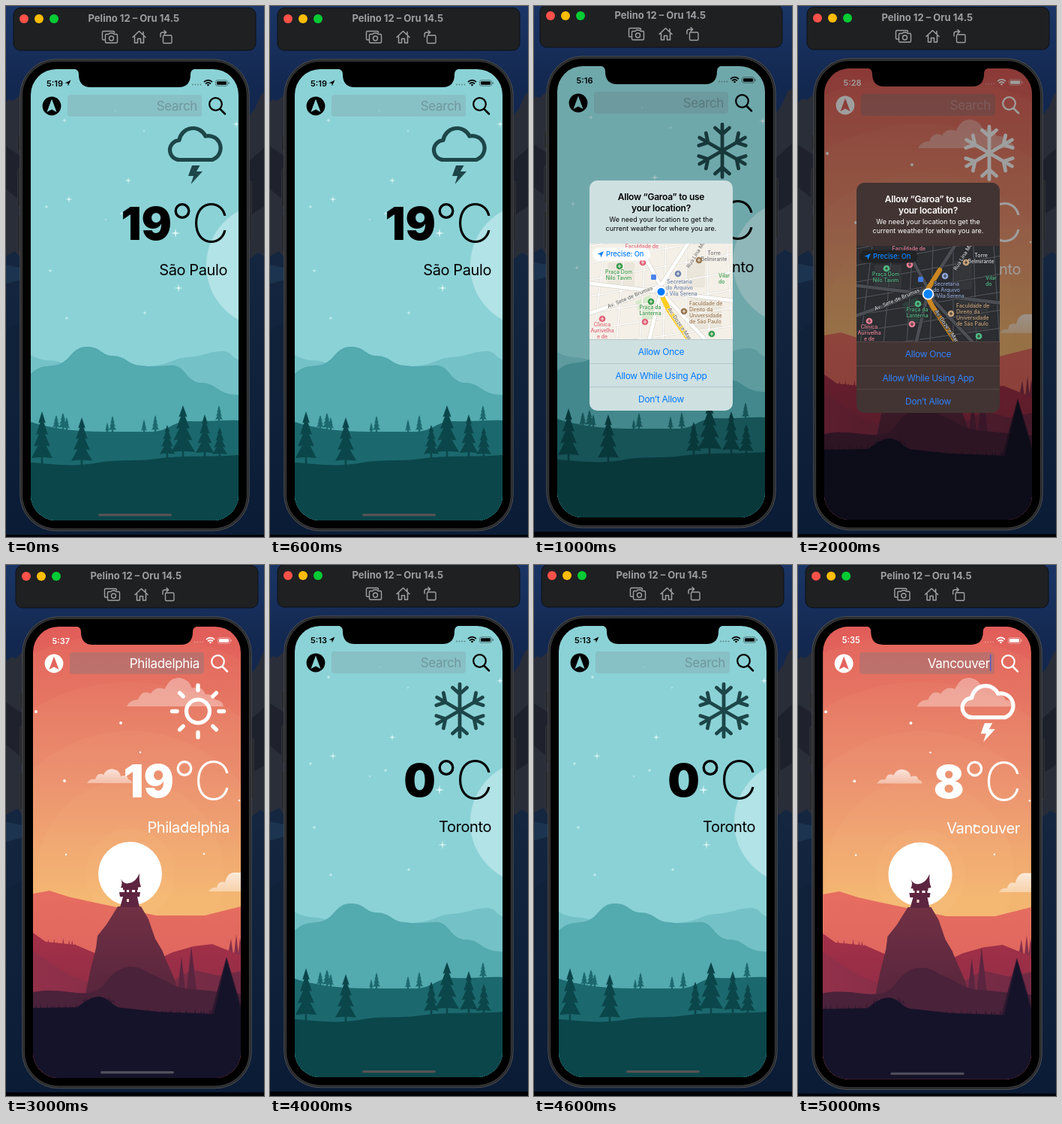
These frames come from a looping animation (344x706 px, 6000 ms). An HTML page:

```html
<!DOCTYPE html>
<html lang="en">
<head>
<meta charset="utf-8">
<title>Weather app</title>
<style>
html, body { margin: 0; width: 100%; height: 100%; overflow: hidden; background: #0c1b38; }
svg { display: block; width: 344px; height: 706px; font-family: Inter, Roboto, sans-serif; }
</style>
</head>
<body>
<svg viewBox="0 0 344 706" xmlns="http://www.w3.org/2000/svg">
  <defs>
    <linearGradient id="desk" x2="0" y2="1">
      <stop offset="0" stop-color="#1b3768"/><stop offset=".16" stop-color="#132850"/>
      <stop offset=".5" stop-color="#14263f"/><stop offset="1" stop-color="#0a1b36"/>
    </linearGradient>
    <linearGradient id="dusk" x2="0" y2="1">
      <stop offset="0" stop-color="#e15c59"/><stop offset=".35" stop-color="#e98868"/>
      <stop offset=".6" stop-color="#f0b069"/>
    </linearGradient>
    <linearGradient id="coral" x2="0" y2="1">
      <stop offset="0" stop-color="#e66d60"/><stop offset="1" stop-color="#d65d5c"/>
    </linearGradient>
    <linearGradient id="peak" x2="0" y2="1">
      <stop offset="0" stop-color="#713044"/><stop offset="1" stop-color="#54243b"/>
    </linearGradient>
    <linearGradient id="wine" x2="0" y2="1">
      <stop offset="0" stop-color="#a33048"/><stop offset="1" stop-color="#7b2943"/>
    </linearGradient>
    <linearGradient id="plum">
      <stop offset="0" stop-color="#93304a"/><stop offset="1" stop-color="#702a44"/>
    </linearGradient>
    <linearGradient id="puff" x2="0" y2="1">
      <stop offset="0" stop-color="#fff" stop-opacity=".75"/><stop offset="1" stop-color="#fff" stop-opacity=".4"/>
    </linearGradient>
    <clipPath id="screen"><rect x="33" y="84" width="277" height="600" rx="34"/></clipPath>
    <clipPath id="map"><rect x="76" y="320" width="191" height="127"/></clipPath>
  </defs>
  <g id="stage"></g>
</svg>
<script>
const shots = [
  { x: 0, y: 0, time: '5:19', temp: '19', city: 'São Paulo', icon: 'storm', here: true },
  { x: -2, y: -4, time: '5:16', temp: '0', city: 'Toronto', icon: 'snow', ask: true },
  { x: 2, y: -1, time: '5:28', temp: '0', city: 'Toronto', icon: 'snow', dark: true, ask: true },
  { x: 3, y: -2, time: '5:37', temp: '19', city: 'Philadelphia', icon: 'sun', dark: true, query: 'Philadelphia' },
  { x: 0, y: -3, time: '5:13', temp: '0', city: 'Toronto', icon: 'snow', here: true },
  { x: 0, y: -2.4, k: 1.003, time: '5:35', temp: '8', city: 'Vancouver', icon: 'storm', dark: true, query: 'Vancouver', caret: true }
];

const path = (d, fill, more = '') => `<path d="${d}" fill="${fill}" ${more}/>`;
const line = (d, color, w, more = '') =>
  path(d, 'none', `stroke="${color}" stroke-width="${w}" stroke-linecap="round" stroke-linejoin="round" ${more}`);
const disc = (x, y, r, fill, more = '') => `<circle cx="${x}" cy="${y}" r="${r}" fill="${fill}" ${more}/>`;
const box = (x, y, w, h, r, fill, more = '') =>
  `<rect x="${x}" y="${y}" width="${w}" height="${h}" rx="${r}" fill="${fill}" ${more}/>`;
const text = (x, y, s, size, fill, more = '') =>
  `<text x="${x}" y="${y}" font-size="${size}" fill="${fill}" ${more}>${s}</text>`;
const END = 'text-anchor="end"', MID = 'text-anchor="middle"';
const spaced = v => `letter-spacing="${v}"`;
const each = (list, fn) => list.map(a => fn(...a)).join('');

function star(x, y, r) {
  const q = r * .14;
  return path(`M${x} ${y - r}L${x + q} ${y - q}L${x + r} ${y}L${x + q} ${y + q}L${x} ${y + r}L${x - q} ${y + q}L${x - r} ${y}L${x - q} ${y - q}Z`, '#e2f7f7');
}

function tree(x, top, base, w) {
  const right = [], left = [];
  for (let i = 1; i <= 4; i++) {
    const y = top + (base - top) * .9 * i / 4, half = w * (i + .6) / 4.6;
    const inner = i < 4 ? half * .5 : 1.3;
    right.push([x + half, y], [x + inner, y - 1]);
    left.unshift([x - inner, y - 1], [x - half, y]);
  }
  return 'M' + [[x, top], ...right, [x + 1.3, base + 3], [x - 1.3, base + 3], ...left].join('L') + 'Z';
}

function spikes(x0, x1, y, h, step) {
  let d = '';
  for (let x = x0, i = 0; x < x1; x += step, i++) {
    d += `M${x} ${y}l1.3 ${-h * (.55 + .45 * Math.sin(i * 2.4))}l1.3 ${h}Z`;
  }
  return d;
}

const hill = (x, y, curve, fill) => path(`M${x} ${y}${curve}V684H${x}Z`, fill);

function lightScene() {
  const back = [[67, 544, 562, 5], [76, 541, 563, 6], [81, 547, 563, 4], [135, 554, 566, 3], [142, 545, 566, 5],
    [184, 550, 566, 4], [199, 544, 566, 5], [284, 531, 552, 5]];
  const front = [[48, 539, 608, 14], [101, 547, 611, 14], [236, 531, 600, 16], [265, 543, 600, 12],
    [215, 557, 600, 10], [285, 560, 600, 10]];
  const stars = [[78, 152, 3], [146, 139, 1.5], [184, 166, 2], [307, 157, 5], [163, 232, 4.5], [84, 257, 5],
    [54, 267, 3], [154, 276, 3], [133, 284, 2], [226, 302, 6.5], [230, 375, 6], [59, 352, 3], [185, 408, 3], [81, 415, 3]];
  return box(33, 84, 277, 600, 0, '#8bd2d6') + disc(349, 345, 82, '#b2e3e6') + each(stars, star) +
    hill(33, 464, 'C48 473 58 470 70 473C110 486 160 482 198 478C224 475 222 468 242 467C270 465 268 459 290 459C302 460 301 468 310 470', '#74c2c7') +
    hill(33, 489, 'C47 476 56 480 68 477C86 473 87 453 108 453C126 453 127 464 141 465C161 465 163 478 181 478C199 481 214 477 225 478C241 482 240 498 259 501C282 500 280 517 310 517', '#53aaaf') +
    hill(33, 553, 'C60 562 96 566 130 566H196C217 565 222 552 245 552C270 553 290 550 310 551', '#1b696e') +
    path(back.map(a => tree(...a)).join(''), '#1b696e') +
    hill(33, 607, 'C64 609 88 613 118 608C145 602 175 606 200 602C230 597 276 600 310 597', '#0b464a') +
    path(front.map(a => tree(...a)).join(''), '#0b464a');
}

function temple() {
  const c = '#5d2540';
  return path('M150 419Q154 427 161 425Q170 424 175 412Q174 423 177 430Q164 433 150 431Q153 425 150 419Z', c) +
    box(153, 430, 20, 4, 0, c) + box(155, 433, 3, 7, 0, c) + box(161, 433, 4, 7, 0, c) + box(169, 433, 3, 7, 0, c) +
    path('M148 437H176L175 443H149Z', c) + path('M153 443H172L175 457H149Z', c) + box(158, 446, 3, 4, 0, '#f1d9cf');
}

function darkScene() {
  const stars = [[37, 197, 1.9], [150, 212, 1.9], [176, 251, 1.2], [75, 289, 1.9], [235, 348, 1.9], [261, 386, 1.2], [77, 387, 1.2], [308, 315, 1.3]];
  const halo = [320, 255, 190, 125, 60].map(r => disc(162.5, 412.5, r, '#ffd9a0', 'opacity=".05"')).join('');
  return box(33, 84, 277, 600, 0, 'url(#dusk)') + halo +
    path('M158 190Q162 181 173 181Q178 167 190 173Q197 162 209 167Q215 151 229 152Q241 154 245 166Q257 161 263 174Q272 172 276 181Q286 182 287 190Z', '#fff', 'opacity=".34"') +
    path('M105 292Q108 286 116 287Q119 277 127 281Q132 271 142 274Q149 276 150 283Q159 280 160 287Q165 288 165 292Z', 'url(#puff)') +
    path('M267 436Q271 430 278 431Q280 421 289 424Q292 409 306 411L310 411V436Z', 'url(#puff)') +
    each(stars, (x, y, r) => disc(x, y, r, '#fff')) + disc(162.5, 412.5, 42.5, '#fff') +
    hill(33, 439, 'L55 435L80 443L107 449L197 468L262 468L310 456', 'url(#coral)') +
    path('M301 520L304 493L307 520ZM293 520L297 499L300 520ZM306 525L309 497L313 525Z', '#85304a') +
    hill(33, 491, 'L50 503L90 507L120 520L200 526L219 517L247 509L272 506L310 521', 'url(#wine)') +
    path(spikes(48, 90, 507, 9, 4), '#a03048') +
    hill(33, 515, 'L57 531L83 548L106 556L210 561L245 540L280 548L310 542', 'url(#plum)') +
    path('M99 592L109 543L117 511L119 495L131 480L146 456H177L187 473L196 499L205 514L212 531L221 551L234 592Z', 'url(#peak)') +
    path('M225 575L231 523L237 575ZM237 575L244 509L252 575Z', '#5b2540') +
    hill(33, 570, 'C75 561 110 585 129 558C145 534 169 530 188 545C208 551 220 566 246 566L310 572', '#4a223a') +
    path(spikes(33, 100, 594, 10, 3) + spikes(100, 140, 582, 7, 3) + spikes(140, 275, 598, 6, 4), '#2d1930') +
    path('M270 600L291 523L314 600Z', '#2d1930') +
    hill(33, 591, 'L92 590C105 580 112 576 121 576C136 577 138 591 154 591L200 596L274 599L291 527L310 592', '#151329') +
    temple();
}

const icons = {
  storm: c => line('M232 204.5A13 13 0 0 1 231 178.5A18.5 18.5 0 0 1 266 173A16.4 16.4 0 0 1 275 204.5Z', c, 5.2) +
    path('M248 212H258.5L254 220H262L246.5 237L250 226H243Z', c),
  snow: c => {
    let s = '';
    for (let a = 0; a < 360; a += 60) {
      s += line('M253 196.5V161.5M243.5 166L253 174.5L262.5 166', c, 4.8, `transform="rotate(${a} 253 196.5)"`);
    }
    return s;
  },
  sun: c => {
    let s = disc(253, 196.5, 15.5, 'none', `stroke="${c}" stroke-width="5.2"`);
    for (let a = 0; a < 360; a += 45) s += line('M253 168.5V162', c, 5.4, `transform="rotate(${a} 253 196.5)"`);
    return s;
  }
};

function status(s, c) {
  const x = s.here ? 54 : 58.5;
  return text(x, 106.5, s.time, 11, c, 'font-weight="600"') +
    (s.here ? path('M78.5 102.5L86.5 98.5L82.7 106.5L82.3 102.8Z', c) : '') +
    [249, 252.5, 256, 259.5].map(x => disc(x, 104.5, .9, c, 'opacity=".35"')).join('') +
    line('M264.5 100.6Q269.5 96.5 274.5 100.6M266.6 103Q269.5 100.7 272.4 103', c, 1.7) + disc(269.5, 105, 1.3, c) +
    box(279.5, 98.7, 16, 7.6, 2.2, 'none', `stroke="${c}" stroke-opacity=".45" stroke-width=".9"`) +
    box(281, 100.2, 13, 4.6, 1, c) + box(296.6, 101, 1.2, 3, .6, c, 'opacity=".5"');
}

function weather(s) {
  const c = s.dark ? '#fff' : '#000';
  const hint = s.dark ? 'rgba(235,235,245,.3)' : 'rgba(60,60,67,.3)';
  return status(s, c) + disc(61, 133, 12.4, c) +
    path('M61 123.5L67.5 141L61 137.5L54.5 141Z', s.dark ? '#e2655c' : '#8bd2d6') +
    box(82, 118, 179, 29, 4, s.dark ? 'rgba(120,120,128,.36)' : 'rgba(120,120,128,.2)') +
    text(255, 139, s.query || 'Search', 17, s.query ? c : hint, END + spaced(-.34)) +
    (s.caret ? box(255.2, 121, 1.4, 22, .5, '#4b58c8') : '') +
    disc(279.5, 130.5, 8.3, 'none', `stroke="${c}" stroke-width="2.2"`) + line('M285.5 137L292 143.5', c, 2.5) +
    icons[s.icon](s.dark ? '#fff' : '#1d4649') +
    text(221, 311, s.temp, 60, c, END + ' font-weight="900"') +
    disc(235, 272.5, 8.8, 'none', `stroke="${c}" stroke-width="3.3"`) +
    text(298, 314, 'C', 70, c, END + ' font-weight="200"') +
    text(295, 358, s.city, 20, c, END + spaced(-.4)) +
    (s.ask ? '' : box(123, 675, 98, 3.2, 1.6, s.dark ? '#504f5c' : '#565356'));
}

function cityMap(dark) {
  const p = dark
    ? { land: '#2b2d31', block: '#343639', road: '#4b4e53', edge: '#222428', gold: '#c98622', name: '#d6d6d8', park: '#52bd85', health: '#ee8096', school: '#cda67a', town: '#90a6d8', pill: '#202124', blue: '#0a84ff' }
    : { land: '#f4f0e7', block: '#ebe6db', road: '#ffffff', edge: '#d9d4ca', gold: '#fccd20', name: '#77777a', park: '#369a4b', health: '#e26078', school: '#96734e', town: '#6c82ae', pill: '#ffffff', blue: '#007aff' };
  const halo = `stroke="${p.land}" stroke-width="1.6" paint-order="stroke" font-weight="500"`;
  const label = (x, y, rows, c, anchor = MID) =>
    rows.split('|').map((r, i) => text(x, y + i * 8, r, 6.9, p[c], anchor + halo)).join('');
  const street = (x, y, a, s) => text(0, 0, s, 7, p.name, halo + ` transform="translate(${x} ${y}) rotate(${a})"`);
  const pin = (x, y, c) => disc(x, y, 4.3, p[c]) + line(`M${x} ${y - 2}V${y + 2}M${x - 1.7} ${y}H${x + 1.7}`, p.land, 1);
  let lanes = '';
  for (let i = 0; i < 9; i++) {
    lanes += `M${70 + i * 27} 320L${50 + i * 31} 450M70 ${325 + i * 22}L270 ${285 + i * 24}`;
  }
  const main = 'M72 414L118 398L171 376L207 320M171 384L230 447M171 376L140 320M70 372L171 384M171 384L155 450M171 384L270 396';
  const gold = dark ? 'M187 352L172 376Q168 384 177 400L209 448' : 'M169 382L182 409L209 448';
  return `<g clip-path="url(#map)">` + box(76, 320, 191, 127, 0, p.land) +
    box(205, 340, 25, 38, 2, p.block) + box(100, 345, 36, 32, 2, p.block) + box(210, 392, 42, 42, 2, p.block) +
    path('M137 397L157 388L163 420L146 421Z', dark ? '#2d403a' : '#d5ebc9') +
    line(lanes, p.edge, 2.4) + line(lanes, p.road, 1.5) + line(main, p.edge, 6) + line(main, p.road, 4.6) + line(gold, p.gold, 6.5) +
    label(146, 326, 'Faculdade de', 'health') + pin(147, 345, 'health') +
    pin(116, 350, 'park') + label(115, 360, 'Praça Dom|Nilo Tavim', 'park') +
    label(242, 335, 'Torre|Belmirante', 'name') + pin(222, 342, 'school') +
    pin(194, 360, 'town') + label(196, 373, 'Secretaria|do Arquivo|de Vila Serena', 'town') +
    box(158, 361, 7, 7, 1.5, dark ? '#417be2' : '#4b82ea') +
    pin(158, 397, 'park') + label(157, 407, 'Praça da|Lanterna', 'park') +
    pin(202, 410, 'school') + label(209, 402, 'Faculdade de|Direito da|Universidade|de São Paulo', 'school', '') +
    pin(93, 420, 'health') + label(93, 430, 'Clínica|Aurivelha|e de', 'health') +
    label(248, 365, 'Vilar|do', 'park', '') + pin(239, 440, 'park') + pin(150, 424, 'health') +
    street(101, 406, -23, 'Av. Sete de Brumas') + street(180, 407, 56, 'Av. Doze e Mares') + street(209, 353, -58, 'Rua Lina Morande') +
    '</g>' + box(80, 325.5, 77, 17, 8, p.pill, dark ? 'opacity=".94"' : '') +
    path('M86.5 334L95 330L91.2 338.5L90.5 334.6Z', p.blue) +
    text(98, 337.4, 'Precise: On', 9.4, p.blue, 'font-weight="500"' + spaced(-.1)) +
    disc(171.5, 384, 7.8, '#fff', 'stroke="#000" stroke-opacity=".15" stroke-width=".8"') + disc(171.5, 384, dark ? 6 : 5, p.blue);
}

function alertBox(dark) {
  const c = dark ? '#fff' : '#000', link = dark ? '#2f82ff' : '#007aff';
  const rule = dark ? 'rgba(255,255,255,.13)' : 'rgba(40,70,75,.22)';
  const row = (y, s) => text(171.5, y, s, 12, link, MID + spaced(-.3));
  const head = (y, s) => text(171.5, y, s, 12, c, MID + ' font-weight="600"' + spaced(-.24));
  return box(33, 84, 277, 600, 0, '#000', `opacity="${dark ? .38 : .2}"`) +
    box(76, 236, 191, 306, 10, dark ? '#423432' : '#cfe0e1') +
    head(262, 'Allow “Garoa” to use') + head(277, 'your location?') +
    text(171.5, 291, 'We need your location to get the', 9, c, MID) +
    text(171.5, 302.5, 'current weather for where you are.', 9, c, MID) + cityMap(dark) +
    box(76, 447, 191, .7, 0, rule) + box(76, 479, 191, .7, 0, rule) + box(76, 510.3, 191, .7, 0, rule) +
    row(468.3, 'Allow Once') + row(499.6, 'Allow While Using App') + row(531.2, 'Don’t Allow');
}

function desktop() {
  return box(-10, -10, 370, 730, 0, 'url(#desk)') +
    path('M-10 136L4 124L10 126L30 108V350L12 326L-10 338Z', '#2a2e39') + path('M-10 180L20 200V260L-10 235Z', '#1f222c') +
    path('M320 152L332 136L340 118L354 108V338L336 328L320 340Z', '#292d38') + path('M320 210L354 180V260L320 282Z', '#1d212b') +
    path('M-10 440L20 420V520L-10 500Z', '#10213a') + path('M-10 342L20 348V364L-10 372Z', '#1d3450') +
    box(-10, 703, 370, 20, 0, '#020408');
}

function toolbar() {
  const c = '#a0a1a3';
  return box(10, 2.5, 323, 56.5, 9, '#1f2022', 'stroke="#0b0c0f" stroke-width=".8"') +
    disc(24, 17, 6, '#ff514a') + disc(44, 17, 6, '#ffbd04') + disc(64, 17, 6, '#04cb33') +
    text(170.3, 21.4, 'Pelino 12 – Oru 14.5', 13, '#9d9ea2', MID + ' font-weight="700"') +
    line('M131.5 45H129.5Q128.5 45 128.5 43.5V35Q128.5 33.5 130 33.5H143Q144.5 33.5 144.5 35.5', c, 1.4) +
    line('M133.5 37.5H137L138.5 36H142.5L144 37.5H147.5Q148.5 37.5 148.5 39V47.5Q148.5 49 147 49H134Q132.5 49 132.5 47.5V39Q132.5 37.5 133.5 37.5Z', c, 1.4) +
    disc(140.5, 43, 3, 'none', `stroke="${c}" stroke-width="1.4"`) +
    line('M169 41.5L177.5 33.5L186 41.5M171.5 40V49H175.5V43.5H179.5V49H183.5V40M183 38V34.5', c, 1.5) +
    box(209.5, 39, 11.5, 10.5, 1.6, 'none', `stroke="${c}" stroke-width="1.4"`) +
    line('M206 41V38Q206 35 209 35H213M211 32.5L213.7 35L211 37.5', c, 1.4);
}

function phone(s) {
  const keys = [[15.5, 171, 22], [15.5, 217, 50], [15.5, 277, 50], [323.5, 233, 80]];
  return each(keys, (x, y, h) => box(x, y, 4, h, 1.2, '#25272b', 'stroke="#3e4146" stroke-width=".5"')) +
    box(18.8, 70.8, 305.4, 627, 48, '#27282a', 'stroke="#4c4e51" stroke-width="1"') +
    box(21.5, 73.5, 300, 621.6, 45.5, '#000', 'stroke="#37393b" stroke-width="1.2"') +
    `<g clip-path="url(#screen)">${s.dark ? darkScene() : lightScene()}${weather(s)}${s.ask ? alertBox(s.dark) : ''}</g>` +
    path('M90 83.5Q97 84 97 91Q97 108 113 108H230Q246 108 246 91Q246 84 253 83.5Z', '#000');
}

const draw = s => `<g transform="translate(${s.x} ${s.y}) scale(${s.k || 1})">${desktop()}${toolbar()}${phone(s)}</g>`;

const stage = document.getElementById('stage');
let shown = -1;
function update() {
  const i = Math.floor(performance.now() / 1000) % shots.length;
  if (i !== shown) stage.innerHTML = draw(shots[shown = i]);
  requestAnimationFrame(update);
}
update();
</script>
</body>
</html>
```
